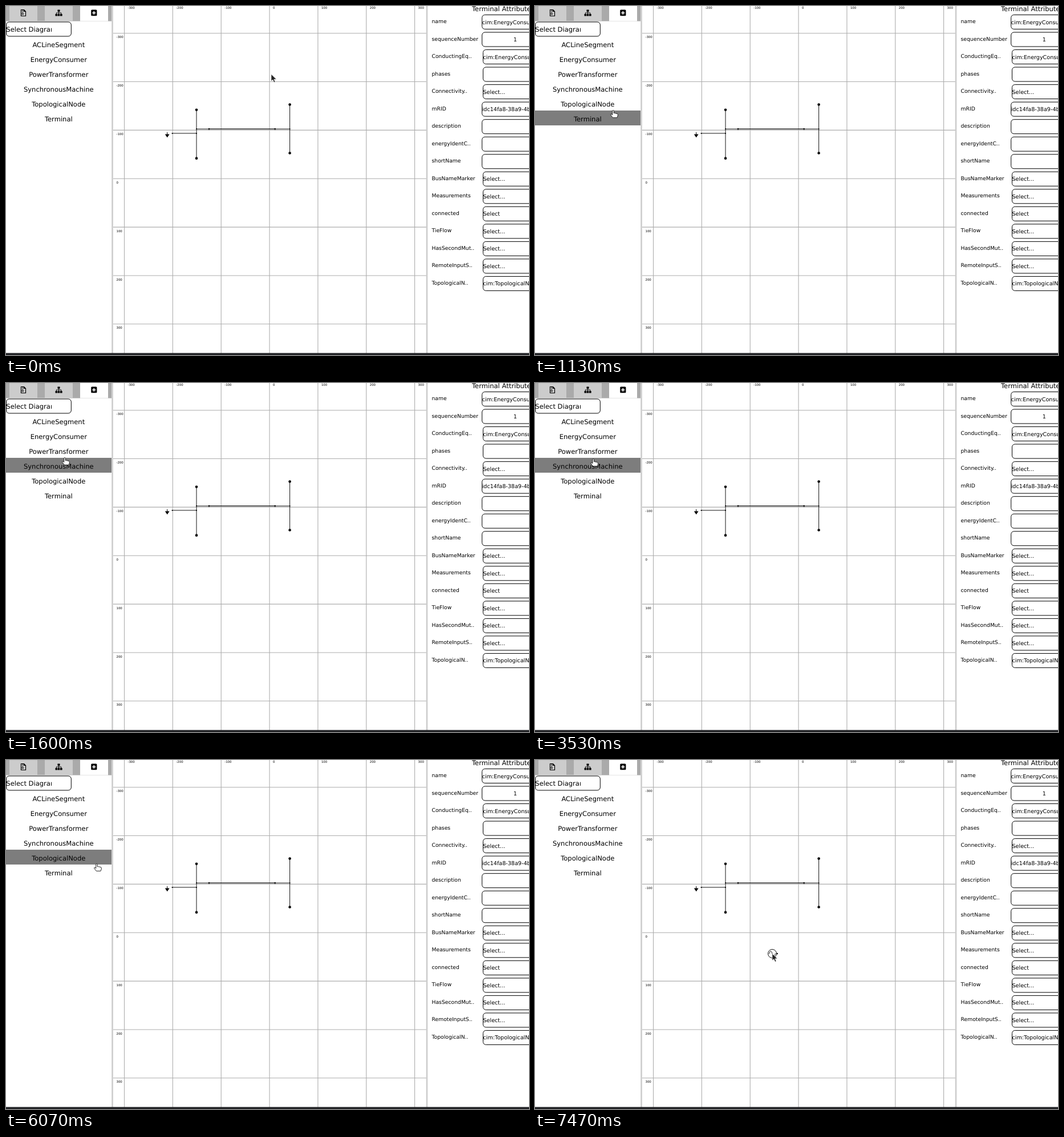
Recreate the animation shown at these times as an HTML page. Size 917 by 611 pixels, loop 8000 ms.

```html
<!DOCTYPE html>
<html lang="en">
<head>
<meta charset="utf-8">
<title>Grid editor</title>
<style>
  html, body { margin: 0; width: 100%; height: 100%; overflow: hidden; background: #fff; }
  svg { display: block; }
  text { font-family: "DejaVu Sans", sans-serif; text-rendering: geometricPrecision; }
  .menu { font-size: 11.55px; }
  .form { font-size: 9.24px; }
  .field { font-size: 9.6px; }
  .axis { font-size: 5.4px; }
  .box { fill: #fff; stroke: #000; }
  .grid { stroke: #adadad; stroke-width: 1.1; }
  .wire { stroke: #111; fill: none; }
</style>
</head>
<body>
<svg id="stage" width="917" height="611" viewBox="0 0 917 611">
  <rect id="hover" width="185" height="26" fill="#7d7d7d"/>
  <g id="tabs">
    <rect width="185" height="26.6" fill="#aaa"/>
    <path d="M6 0h49v26.6H6zM68 0h49v26.6H68z" fill="#ccc"/>
    <path d="M130 0h49v26.6h-49z" fill="#fff"/>
    <path d="M26.5 6.5h5l3 3v8h-8zM31.5 6.5v3h3" fill="none" stroke="#000" stroke-width="1.2"/>
    <path d="M29.3 7v5" stroke="#000" stroke-width="1.4" stroke-dasharray="1 .6"/>
    <circle cx="29.3" cy="13.8" r="1.3" fill="none" stroke="#000"/>
    <path d="M90.5 6.5h4v3.5h-4zM86.5 14h3.6v3.5h-3.6zM90.7 14h3.6v3.5h-3.6zM95 14h3.6v3.5H95z"/>
    <path d="M92.5 10v4M88.3 14v-2h8.5v2" fill="none" stroke="#000"/>
    <rect x="149.2" y="6.6" width="10.2" height="10.6" rx="1.5"/>
    <path d="M151.2 12h6.1M154.25 9v6" stroke="#fff" stroke-width="1.7"/>
  </g>
  <rect class="box" x=".5" y="28" width="113.8" height="25" rx="5"/>
  <svg width="80" height="60"><text class="menu" x="0.3" y="45">Select Diagram</text></svg>
  <g id="layout"></g>
  <path d="M186.5 0v608M738 0v608" stroke="#ccc" stroke-width="2.6"/>
  <rect y="607.5" width="917" height="3.5" fill="#222326"/>
  <g id="network"></g>
  <path d="M282.2 221h1v3.6h3.4l-3.9 5.6-3.9-5.6h3.4z"/>
  <g id="machine">
    <circle class="wire" r="7.5"/>
    <path class="wire" d="M-5.5 0.5C-4-6-1.5-5.5 0 0S4 6 5.5-.5"/>
  </g>
  <circle id="terminal" cx="424.7" cy="339" r="1.2"/>
  <path id="arrow" d="M0 0v12l2.8-2.5 2.2 4.8 2-.9-2.1-4.6H9z" fill="#222" stroke="#fff" stroke-width=".6"/>
  <path id="hand" d="M-1.3.3Q0-1.5 1.2.3V4.6Q2.5 3.7 3.6 5 5 4.3 6 5.6 8 5 8.2 6.6V9L7 12.4H-.6L-4.4 7.6Q-4.6 5.8-3 6.3L-1.3 7.6z"
    fill="#fff" stroke="#111" stroke-width=".9"/>
</svg>
<script>
const LOOP = 8000, STEP = 200 / 3, CELL = 84.85, ROW = 26, FIELD = 30.53;
const $ = id => document.getElementById(id);
const layout = $('layout'), network = $('network');

function add(parent, tag, attrs, content = '') {
  const el = document.createElementNS('http://www.w3.org/2000/svg', tag);
  for (const name in attrs) el.setAttribute(name, attrs[name]);
  el.textContent = content;
  return parent.appendChild(el);
}
const label = (kind, x, y, content, anchor = 'start') =>
  add(layout, 'text', { class: kind, x, y, 'text-anchor': anchor }, content);

// Coordinate grid
for (let i = 0; i < 7; i++) {
  const x = 207.5 + CELL * i, y = 47.7 + CELL * i, value = (i - 3) * 100;
  add(layout, 'path', { class: 'grid', d: `M${x} 0V608M188 ${y}H737` });
  label('axis', x + 6, 5, value);
  label('axis', 193.5, y + 8.6, value);
}

['ACLineSegment', 'EnergyConsumer', 'PowerTransformer', 'SynchronousMachine', 'TopologicalNode', 'Terminal']
  .forEach((name, i) => label('menu', 92.3, 71.7 + ROW * i, name, 'middle'));

// Attribute form: plain inputs sit a little further left than drop-downs
const inputs = ['name', 'sequenceNumber', 'mRID', 'description', 'energyIdentC..', 'shortName'];
const values = {
  name: 'cim:EnergyConsumer', sequenceNumber: '1', 'ConductingEq..': 'cim:EnergyConsumer', phases: '',
  'Connectivity..': 'Select...', mRID: 'idc14fa8-38a9-4b', description: '', 'energyIdentC..': '',
  shortName: '', BusNameMarker: 'Select...', Measurements: 'Select...', connected: 'Select',
  TieFlow: 'Select...', 'HasSecondMut..': 'Select...', 'RemoteInputS..': 'Select...',
  'TopologicalN..': 'cim:TopologicalNode'
};
label('menu', 817, 9, 'Terminal Attributes');
Object.entries(values).forEach(([name, value], i) => {
  const y = FIELD * i, x = inputs.includes(name) ? 834.7 : 836.5;
  const centred = name === 'sequenceNumber';
  label('form', 746.5, y + 30, name);
  add(layout, 'rect', { class: 'box', x, y: y + 15.5, width: 116, height: 25, rx: 5 });
  label('field', centred ? x + 58 : x, y + 31.5, value, centred ? 'middle' : 'start');
});

// Power network: bars with end dots, joined by wires
function line(x1, y1, x2, y2, r) {
  add(network, 'path', { class: 'wire', d: `M${x1} ${y1}L${x2} ${y2}` });
  dot(x1, y1, r);
  dot(x2, y2, r);
}
const dot = (cx, cy, r) => add(network, 'circle', { cx, cy, r });
const bar = (x, y) => line(x, y, x, y + CELL, 2.3);
bar(334, 181.8);
bar(497.6, 172.6);
line(334, 215.3, 497.6, 215.3, 1);
line(356, 215.3, 471.7, 215.3, 1.4);
line(291.5, 222.9, 334, 222.9, 1);

// Pointer moves: first step, number of steps, destination
const start = [465, 119.5];
const moves = [
  [0, 4, 241.5, 137.5], [9, 8, 137, 183], [17, 7, 103, 131], [52, 4, 100, 140], [90, 1, 159, 182],
  [91, 3, 343, 363], [98, 1, 353, 363], [99, 4, 417, 340], [111, 1, 416, 339]
];
const pointerAt = step => moves.reduce(([x, y], [from, count, toX, toY]) => {
  const p = Math.min(1, Math.max(0, (step - from) / count));
  return [x + (toX - x) * p, y + (toY - y) * p];
}, start);

function place(id, visible, x, y) {
  $(id).setAttribute('visibility', visible ? 'visible' : 'hidden');
  $(id).setAttribute('transform', `translate(${x} ${y})`);
}

function draw(now) {
  const step = Math.floor((now % LOOP + 3.4) / STEP);
  const [x, y] = pointerAt(step);
  const overMenu = x < 185, placed = step >= 112, dragging = step > 91 && !placed;
  const offset = dragging ? 8 : 0;
  place('hover', overMenu, 0, 53 + ROW * Math.floor((y - 53) / ROW));
  place('hand', overMenu, x, y);
  place('arrow', !overMenu && !dragging, x, y);
  place('machine', dragging || placed, x + offset, y + offset);
  place('terminal', placed, 0, 0);
  requestAnimationFrame(draw);
}
requestAnimationFrame(draw);
</script>
</body>
</html>
```
